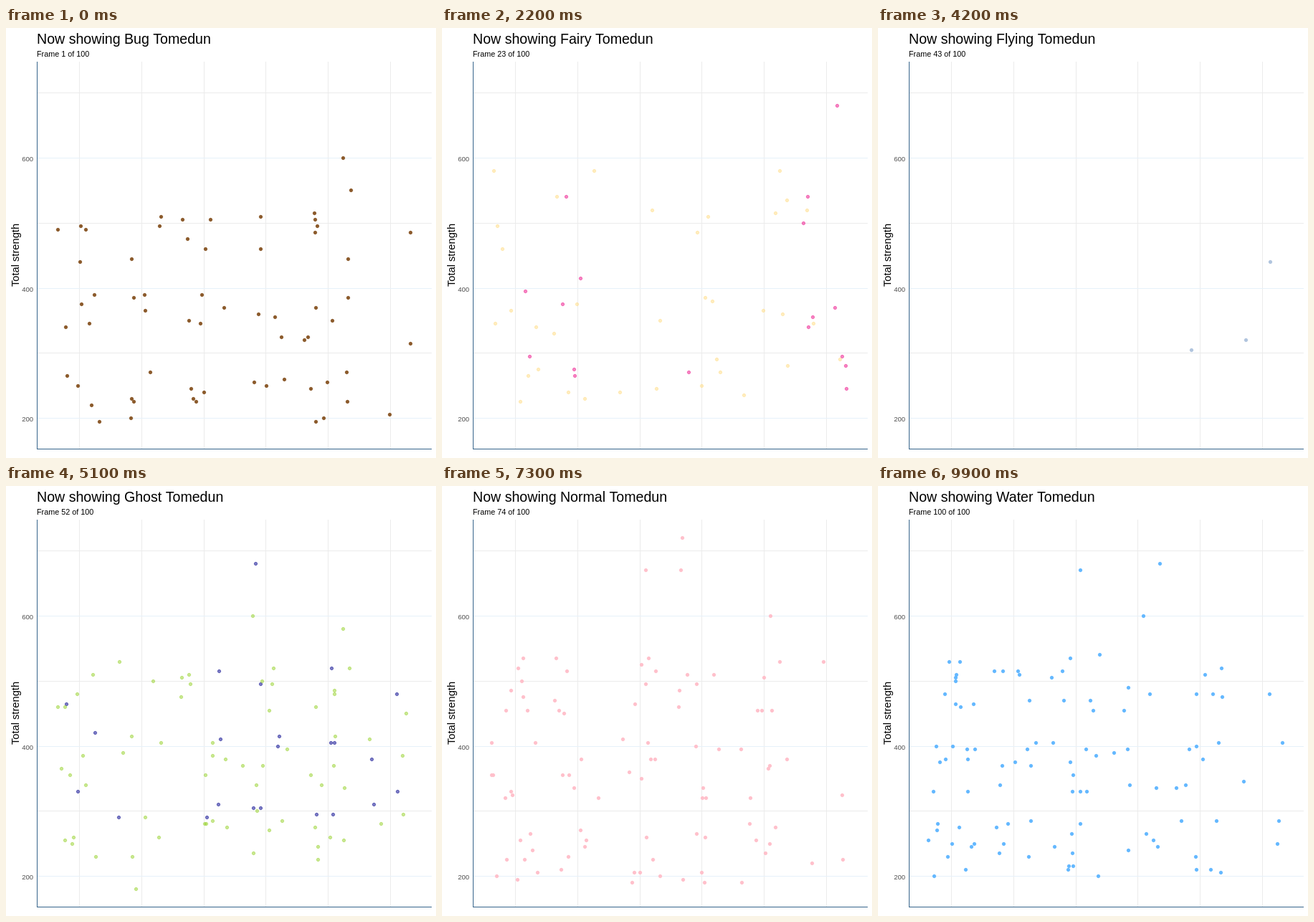
These frames come from a looping animation (600x600 px, 10000 ms). An HTML page with a canvas:

```html
<!DOCTYPE html>
<html>
<head>
<meta charset="utf-8">
<style>
html, body { margin: 0; width: 100%; height: 100%; overflow: hidden; background: #fff; }
canvas { display: block; }
</style>
</head>
<body>
<canvas id="stage" width="600" height="600"></canvas>
<script>
const ctx = document.getElementById('stage').getContext('2d');
const FONT = '"Liberation Sans", Arial, sans-serif';
const STEP = 100, FRAMES = 100, PERIOD = 5.75;
const AXIS = '#36648b', GRID = '#ebebeb', MAJOR = '#e6f1fa', LABEL = '#4d4d4d';

let seed = 7;
const random = () => (seed = seed * 16807 % 2147483647) / 2147483647;
const toY = total => Math.round(544 - (total - 200) * 0.9075);
const colX = col => 102 + 86.8 * col;

// Jittered columns of dots. Totals fall into three bands between low and high,
// in steps of five; outliers are given as [x, total].
function group(name, color, [low, high], counts, outliers = []) {
  const dots = outliers.map(([x, total]) => [x, toY(total)]);
  counts.forEach((count, col) => {
    for (let i = 0; i < count; i++) {
      const band = (i % 3 + 0.7 * random()) / 2.7;
      const total = Math.round((low + (high - low) * band) / 5) * 5;
      dots.push([Math.round(colX(col) + (random() - 0.5) * 67), toY(total)]);
    }
  });
  return { name, color, dots };
}

const groups = [
  group('Bug', '#8b5a2b', [195, 515], [12, 10, 12, 8, 16, 3], [[470, 600], [481, 550]]),
  group('Dark', '#4d4d4d', [220, 600], [0, 5, 4, 3, 13, 3]),
  group('Dragon', '#8968cd', [300, 680], [3, 0, 7, 3, 7, 4]),
  group('Electric', '#ffdc82', [205, 540], [8, 5, 4, 7, 6, 3], [[72, 580], [212, 580], [471, 580]]),
  group('Fairy', '#ee1289', [218, 550], [2, 5, 0, 1, 0, 8], [[551, 680]]),
  group('Fighting', '#e9967a', [210, 525], [7, 2, 4, 2, 7, 3]),
  group('Fire', '#ff3030', [250, 580], [12, 7, 6, 4, 8, 7], [[202, 680], [388, 600], [536, 600]]),
  group('Flying', '#b0c4de', [245, 580], [0, 0, 0, 0, 1, 2]),
  group('Ghost', '#00008b', [275, 525], [3, 1, 4, 5, 5, 4], [[348, 680]]),
  group('Grass', '#95d12a', [220, 530], [12, 8, 12, 12, 14, 5], [[344, 600], [470, 580], [181, 180]]),
  group('Ground', '#cd853f', [265, 600], [8, 3, 6, 3, 10, 0]),
  group('Ice', '#8ee5ee', [250, 580], [2, 4, 6, 3, 6, 2]),
  group('Normal', '#ffc0cb', [190, 540], [22, 15, 17, 15, 16, 4],
    [[335, 720], [284, 670], [333, 670], [458, 600]]),
  group('Poison', '#9932cc', [190, 535], [14, 1, 3, 6, 2, 2]),
  group('Psychic', '#ee6aa7', [198, 600], [8, 7, 8, 7, 14, 3]),
  group('Rock', '#cbb593', [280, 580], [9, 3, 7, 6, 6, 7], [[215, 600], [511, 600]]),
  group('Steel', '#8b8989', [300, 600], [0, 2, 9, 3, 4, 4]),
  group('Water', '#63b8ff', [200, 540], [28, 17, 23, 11, 17, 5], [[282, 670], [393, 680], [370, 600]])
];

function text(str, x, y, size, color = '#000', align = 'left') {
  ctx.font = `${size}px ${FONT}`;
  ctx.fillStyle = color;
  ctx.textAlign = align;
  ctx.fillText(str, x, y);
}

function bar(x, y, w, h, color) {
  ctx.fillStyle = color;
  ctx.fillRect(x, y, w, h);
}

function drawAxes() {
  for (const total of [300, 500, 700]) bar(43, toY(total), 551, 1, GRID);
  for (let col = 0; col < 6; col++) bar(Math.round(colX(col)), 47, 1, 540, GRID);
  for (const total of [200, 400, 600]) {
    const y = toY(total);
    bar(43, y, 551, 1, MAJOR);
    text(total, 38, y + 5, 9.5, LABEL, 'right');
  }
  bar(43, 47, 1, 541, AXIS);
  bar(43, 587, 551, 1, AXIS);
  ctx.save();
  ctx.translate(18, 317);
  ctx.rotate(-Math.PI / 2);
  text('Total strength', 0, 0, 14.7, '#000', 'center');
  ctx.restore();
}

// Fill and rim overlap, so a faded dot keeps a darker edge.
function drawDots({ color, dots }, alpha) {
  ctx.globalAlpha = alpha;
  ctx.fillStyle = ctx.strokeStyle = color;
  ctx.lineWidth = 1;
  for (const [x, y] of dots) {
    ctx.beginPath();
    ctx.arc(x + 0.5, y + 0.5, 2.15, 0, 7);
    ctx.fill();
    ctx.stroke();
  }
  ctx.globalAlpha = 1;
}

// The single blended frame that leads into group n.
const blendFrame = n => Math.floor(PERIOD * n + 0.4);

function draw() {
  const frame = Math.floor(performance.now() / STEP) % FRAMES + 1;
  let now = 0;
  while (blendFrame(now + 1) < frame) now++;
  const next = now + 1;
  const blending = blendFrame(next) === frame;
  // The title moves on early only where the change falls exactly on a frame.
  const shown = frame === PERIOD * next ? next : now;

  bar(0, 0, 600, 600, '#fff');
  drawAxes();
  text(`Now showing ${groups[shown].name} Tomedun`, 43, 22, 19.6);
  text(`Frame ${frame} of ${FRAMES}`, 43, 40, 10.8);
  drawDots(groups[now], blending ? 0.5 : 1);
  if (blending) drawDots(groups[next], 0.5);
  requestAnimationFrame(draw);
}
draw();
</script>
</body>
</html>
```
